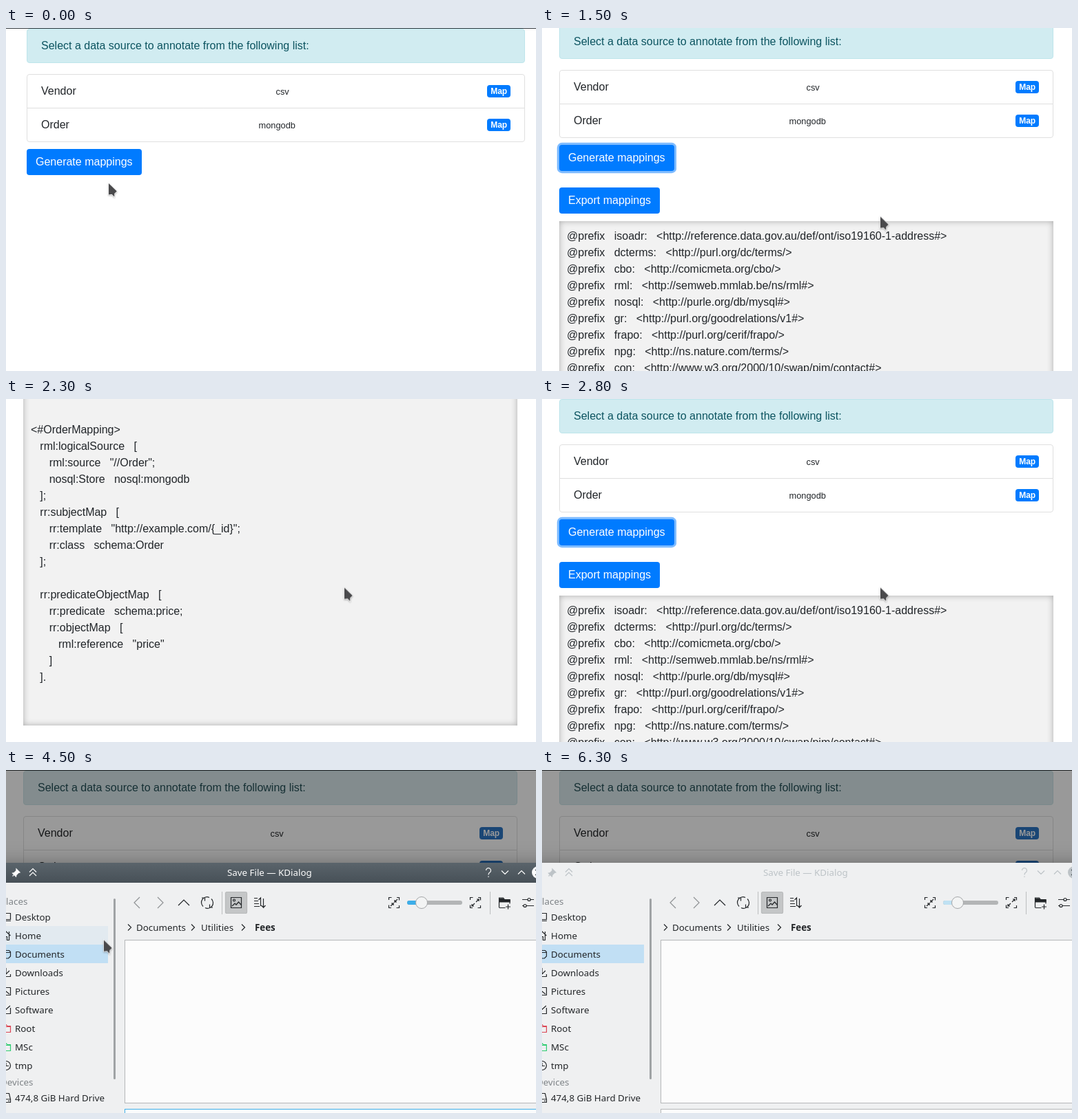
An HTML page for the animation above (6.5 s loop, 769 by 499 pixels).

```html
<!DOCTYPE html>
<html lang="en">
<head>
<meta charset="utf-8">
<title>Mapping generator</title>
<style>
html, body { margin: 0; width: 100%; height: 100%; overflow: hidden; background: #fff; }
#stage, #browser { position: absolute; left: 0; top: 0; width: 769px; height: 499px; overflow: hidden; background: #fff; }
#page { position: absolute; left: 30px; top: 0; width: 723px; font: 16px/24px "Liberation Sans", Arial, sans-serif; color: #212529; }
#page > *, .row > * { position: absolute; box-sizing: border-box; }
.nav { left: -40px; top: 0; width: 900px; height: 1px; background: #343a40; }
.alert { top: 1px; width: 100%; height: 50px; padding: 12px 20px; background: #d1ecf1; border: 1px solid #bee5eb; border-radius: 4px; color: #0c5460; }
.row { width: 100%; height: 50px; border: 1px solid #dfdfdf; }
.row span { left: 20px; top: 12px; }
.row small { top: 13px; font-size: 12.8px; }
.row b { right: 20px; top: 15px; padding: 3px 4.8px; font-size: 12px; line-height: 12px; color: #fff; background: #007bff; border-radius: 4px; }
.btn { height: 38px; padding: 7px 13px; white-space: nowrap; color: #fff; background: #007bff; border-radius: 4px; }
#result { top: 287px; width: 100%; margin: 0; padding: 10px 11px; font: inherit; background: #f2f2f2; box-shadow: inset 0 0 10px #aaa; }
#dialog { position: absolute; left: -30px; top: 135px; width: 850px; height: 420px; box-shadow: 0 5px 30px rgba(0,0,0,.4); }
#dialog svg { position: absolute; left: 30px; top: -135px; overflow: visible; font: 13.33px "Noto Sans", sans-serif; }
#cursor { position: absolute; left: 0; top: 0; overflow: visible; filter: drop-shadow(0 1px 1px rgba(0,0,0,.3)); }
</style>
</head>
<body>
<div id="stage">
  <div id="browser">
    <div id="page">
      <div class="nav"></div>
      <div class="alert">Select a data source to annotate from the following list:</div>
      <div class="row" style="top:67px;border-radius:4px 4px 0 0"><span>Vendor</span><small style="left:calc(50% + 0px)">csv</small><b>Map</b></div>
      <div class="row" style="top:116px;border-radius:0 0 4px 4px"><span>Order</span><small style="left:calc(50% - 25px)">mongodb</small><b>Map</b></div>
      <div class="btn" id="generate" style="top:176px">Generate mappings</div>
      <div class="btn" id="export" style="top:238px">Export mappings</div>
      <pre id="result"></pre>
    </div>
  </div>

  <div id="dialog">
    <svg width="769" height="499" fill="none" stroke-width="1.2">
      <defs>
        <linearGradient id="bar" x2="0" y2="1"><stop stop-color="#5a646b"/><stop offset="1" stop-color="#475057"/></linearGradient>
      </defs>
      <path d="M-30 135H820V555H-30z" fill="#eff0f1"/>
      <rect id="titleBar" x="-30" y="135" width="850" height="29" fill="url(#bar)"/>
      <g id="title" color="#fcfcfc" stroke="currentColor">
        <text x="321" y="154" fill="currentColor" stroke="none">Save File — KDialog</text>
        <path d="M15 144l5 5-2 .5-3 3-.5 2.500-5-5 2.500-.5 3-3z" fill="currentColor"/>
        <path d="M13 151l-3.500 3.500M34 148.500l5-5 5 5M34 154l5-5 5 5M719 146.500l5 5 5-5M743 151.500l5-5 5 5"/>
        <path d="M696.500 146a3.500 3.500 0 1 1 5.500 3q-2 1-2 3.500M700 154.500v1.500"/>
        <circle cx="772" cy="149" r="9" fill="currentColor" stroke="none"/>
        <path d="M768 145l8 8m0-8l-8 8" stroke="#475057"/>
      </g>

      <rect id="hover" x="-10" y="227" width="158" height="27" fill="#e2eaf0"/>
      <path d="M-10 254H148V281H-10z" fill="#c1dff4"/>
      <g id="places" fill="#232629"></g>
      <rect x="156" y="187" width="3" height="263" rx="1.500" fill="#a0a3a5"/>

      <rect x="318.500" y="177.500" width="31" height="31" rx="2" fill="#c4c6c7" stroke="#b8babb"/>
      <path d="M313.500 177v33M702.500 177v33" stroke="#bcbebf" stroke-width="1"/>
      <path d="M194 185l-8 8 8 8M220 185l8 8-8 8" stroke="#909395"/>
      <g stroke="#232629">
        <path d="M250 197l8-8 8 8M286 198.500a8 8 0 0 1 9-13M298 187.500a8 8 0 0 1-9 13M284 186h4.500v4.500M300 200h-4.500v-4.500"/>
        <path d="M326.500 185.500h15v15h-15zM328 198l4-4 2 2 3.500-4 3.500 4"/><circle cx="331" cy="189.500" r="1.500"/>
        <path d="M360 186.500h5M360 190.500h6M360 194.500h7M360 198.500h8M369.500 198v-12l-3 3M373.500 187v13l-3-3m3 3l3-3"/>
        <path d="M555.500 189v-3.500h4M567 185.500h3.500v4M570.500 197v3.500h-4M559 200.500h-3.500v-4M568 188l-4 4v-3m0 3h3M558 198l4-4v3m0-3h-3"/>
        <path d="M673.500 189v-3.500h4M685 185.500h3.500v4M688.500 197v3.500h-4M677 200.500h-3.500v-4M682 192l4-4h-3m3 0v3M680 194l-4 4h3m-3 0v-3"/>
        <path d="M715.500 200V186h6l2 2.500h7.500v6M715.500 200.500h9M725 199h7M728.500 195.500v7"/>
        <path d="M716 187h5l2 2h8v3h-15z" fill="#232629"/>
        <path d="M749 188.500h8m4 0h5M749 197.500h2m4 0h11"/><circle cx="759" cy="188.500" r="2"/><circle cx="753" cy="197.500" r="2"/>
        <path d="M177 224.500l4.500 4.500-4.500 4.500M269 224.500l4.500 4.500-4.500 4.500M342 224.500l4.500 4.500-4.500 4.500"/>
      </g>
      <rect x="582" y="190" width="80" height="6" rx="3" fill="#b3b5b6"/>
      <rect id="level" x="582" y="190" width="22" height="6" rx="3" fill="#3daee9"/>
      <circle cx="603" cy="193" r="8.500" fill="#f3f4f4" stroke="#a3a5a7" stroke-width="1"/>
      <g fill="#232629">
        <text x="189" y="234">Documents</text>
        <text x="283" y="234">Utilities</text>
        <text x="361" y="234" font-weight="bold">Fees</text>
      </g>
      <rect x="172.500" y="247.500" width="640" height="237" fill="#fcfcfc" stroke="#b5b7b8" stroke-width="1"/>
      <rect id="field" x="172.500" y="493.500" width="640" height="30" fill="#fcfcfc" stroke="#3daee9" stroke-width="1"/>
    </svg>
  </div>

  <svg id="cursor" width="14" height="22"><path d="M0 0V16.500L4.500 15.800 8.300 19.500V14.700L11.800 11.500Z" fill="#4a4a4c" stroke="#fff" stroke-width="1.200" paint-order="stroke"/></svg>
</div>

<script>
const LOOP = 6500;
const $ = id => document.getElementById(id);

const prefixes = `isoadr http://reference.data.gov.au/def/ont/iso19160-1-address#
dcterms http://purl.org/dc/terms/
cbo http://comicmeta.org/cbo/
rml http://semweb.mmlab.be/ns/rml#
nosql http://purle.org/db/mysql#
gr http://purl.org/goodrelations/v1#
frapo http://purl.org/cerif/frapo/
npg http://ns.nature.com/terms/
con http://www.w3.org/2000/10/swap/pim/contact#
dbpedia-owl http://dbpedia.org/ontology/
bbc http://www.bbc.co.uk/ontologies/bbc/
mo http://purl.org/ontology/mo/
schema http://schema.org/
rr http://www.w3.org/ns/r2rml#`;

const mapping = `<#OrderMapping>
   rml:logicalSource   [
      rml:source   "//Order";
      nosql:Store   nosql:mongodb
   ];
   rr:subjectMap   [
      rr:template   "http://example.com/{_id}";
      rr:class   schema:Order
   ];

   rr:predicateObjectMap   [
      rr:predicate   schema:price;
      rr:objectMap   [
         rml:reference   "price"
      ]
   ].

 `;

$('result').textContent =
  prefixes.replace(/^(\S+) (.+)$/gm, '@prefix   $1:   <$2>') + '\n\n\n' + mapping;

// Sidebar entries: label, icon path around the row centre, icon colour
const folder = 'M-6-5.500H0L2-3.500H6.500V5.500H-6M-6-2.500H6';
const places = [
  ['Desktop', 'M-6-5.500H6.500V3.500H-6M-4 5.500H7'],
  ['Home', 'M-1-7L6.500 0M4.500-2V6.500H1.500V1.500H-2M4.500-6V-3'],
  ['Documents', 'M-6-5.500H4.500L6.500-3.500V3L3.500 6H-4M-4-2.500H6'],
  ['Downloads', 'M0-7V1M-4-2L0 2 5-3M-6 5.500H6.500V2'],
  ['Pictures', 'M-6-5.500H6.500V5.500H-6M-6 4L0 0 5 4'],
  ['Software', 'M-6 5.500H6.500V-3M-4 3L6-6'],
  ['Root', folder, '#da4453'],
  ['MSc', folder, '#2ecc71'],
  ['tmp', 'M0-6.500A6.500 6.500 0 0 1 0 6.500M0-4V.5H4']
];
const entry = (label, icon, y, color = '#232629') =>
  `<path d="${icon}" transform="translate(0 ${y})" fill="none" stroke="${color}"/><text x="13" y="${y + 5}">${label}</text>`;
const heading = (label, y) => `<text x="-8" y="${y}" fill="#7f8488">${label}</text>`;
$('places').innerHTML = heading('Places', 196) + heading('Devices', 459) +
  places.map(([label, icon, color], i) => entry(label, icon, 214 + 27 * i, color)).join('') +
  entry('474,8 GiB Hard Drive', 'M-4-6.500H4.500L6.500 2V6.500H-4M-4 2H6M3 4.500H5', 477);

// Plays a table of [ms, value] as hard steps over the loop
function play(id, prop, steps, format = v => v) {
  const frames = steps.map(([ms, v]) => ({ offset: ms / LOOP, [prop]: format(v), easing: 'step-end' }));
  frames.push({ ...frames.at(-1), offset: 1 });
  $(id).animate(frames, { duration: LOOP, iterations: Infinity });
}
const appear = (id, ms, from = 0, to = 1) => play(id, 'opacity', [[0, from], [ms, to]]);

const blue = '#007bff', hover = '#0069d9', pressed = '#0062cc';
const ring = a => `0 0 0 3.2px rgba(0,123,255,${a})`;

play('cursor', 'transform', [
  [0, [149, 226]], [200, [147, 217]], [300, [142, 204]], [400, [139, 196]],
  [1300, [230, 225]], [1400, [430, 268]], [1500, [491, 274.5]],
  [3300, [450, 273]], [3400, [320, 264]], [3500, [200, 252]], [3600, [152, 248]], [3700, [142, 247.5]],
  [5600, [190, 215]], [5700, [300, 160]], [5800, [430, 100]], [5900, [540, 60]],
  [6000, [620, 30]], [6100, [670, 8]], [6200, [700, -40]]
], ([x, y]) => `translate(${x}px,${y}px)`);

play('generate', 'backgroundColor', [[0, blue], [300, '#0074ee'], [400, hover], [500, pressed], [600, hover], [1300, blue]]);
play('generate', 'boxShadow', [[0, 0], [500, .3], [600, .5], [3800, 0]], ring);
play('export', 'backgroundColor', [[0, blue], [3600, '#0072ec'], [3700, hover], [3800, pressed], [4000, '#0065d2'], [4100, hover]]);
play('export', 'boxShadow', [[0, 0], [3800, .3], [3900, .5]], ring);

// The page narrows when its scrollbar shows up
appear('export', 700);
appear('result', 700);
play('page', 'left', [[0, '30px'], [700, '25px']]);
play('page', 'width', [[0, '723px'], [700, '717px']]);
play('page', 'transform', [
  [0, 0], [1500, 6], [1600, 45], [1700, 150], [1800, 300], [1900, 427],
  [2000, 510], [2100, 575], [2200, 620], [2300, 648], [2400, 660],
  [2700, 160], [2800, 1], [2900, 0]
], y => `translateY(${-y}px)`);

play('browser', 'filter', [[0, 1], [4300, .8], [4500, .6]], v => `brightness(${v}) saturate(${v})`);
play('dialog', 'opacity', [[0, 0], [4300, .6], [4500, 1]]);
appear('hover', 5600, 1, 0);

// The dialog loses focus
appear('titleBar', 6300, 1, 0);
play('title', 'color', [[0, '#fcfcfc'], [6300, '#bdc3c7']]);
play('level', 'fill', [[0, '#3daee9'], [6300, '#bfe1f3']]);
play('field', 'stroke', [[0, '#3daee9'], [6300, '#b5b7b8']]);
</script>
</body>
</html>
```
